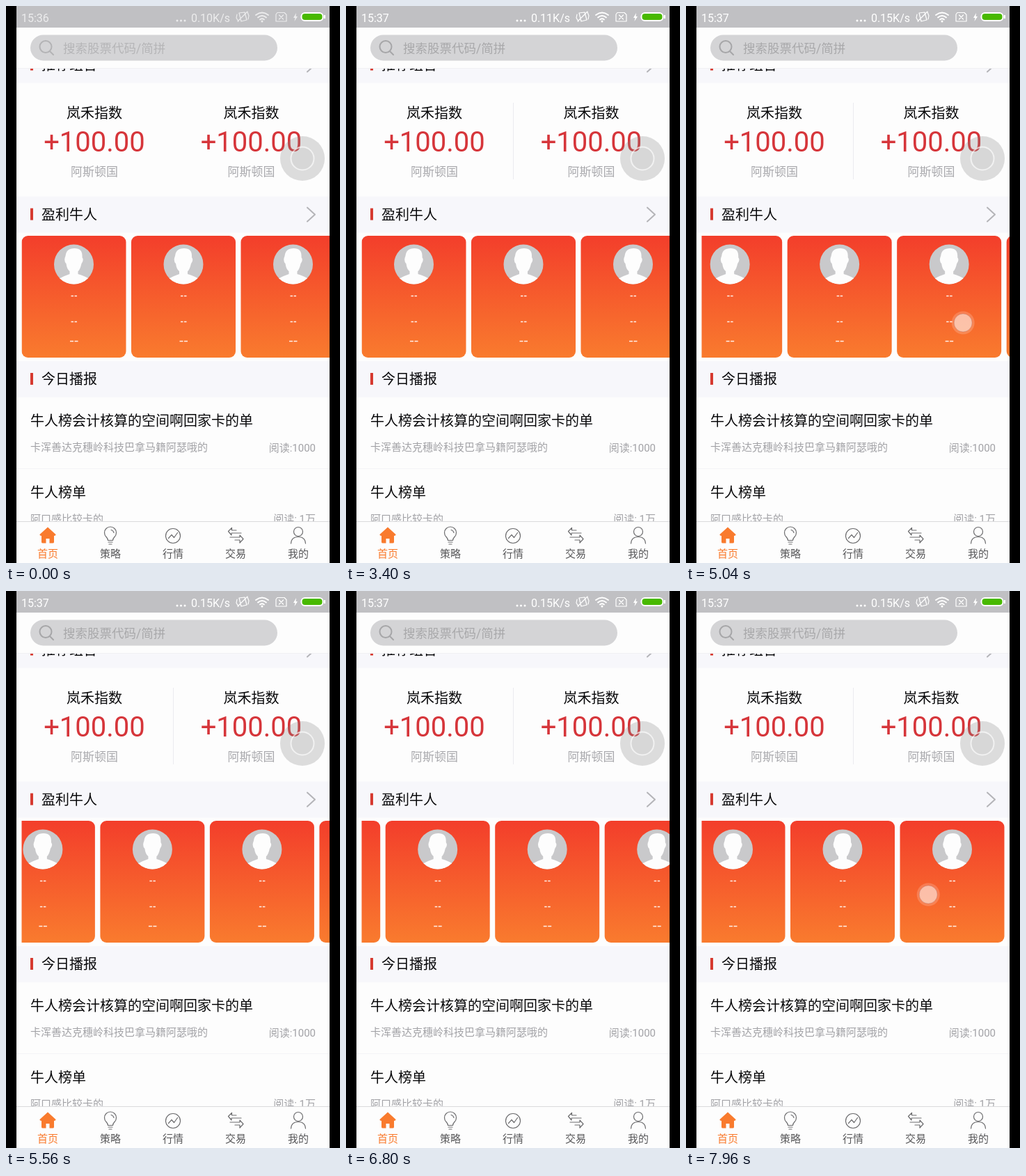
These frames come from a looping animation (480x800 px, 8 s). An HTML page:

```html
<!DOCTYPE html>
<html lang="zh-CN">
<head>
<meta charset="utf-8">
<style>
html, body { margin: 0; width: 100%; height: 100%; overflow: hidden; background: #000; }
svg { display: block; width: 100vw; height: 100vh; }
text { font-family: Roboto, "Noto Sans CJK SC", "Noto Sans CJK", sans-serif; }
.line { fill: none; stroke-width: 1.2; stroke-linecap: round; stroke-linejoin: round; }
.mid { text-anchor: middle; }
.end { text-anchor: end; }
.title { font-size: 20px; fill: #08080a; }
.note { font-size: 15px; fill: #a2a2a6; }
.band { fill: #f7f7fb; }
</style>
</head>
<body>
<svg viewBox="0 0 480 800">
  <defs>
    <linearGradient id="fire" x2="0" y2="1">
      <stop stop-color="#f33e2b"/><stop offset="1" stop-color="#f97b2e"/>
    </linearGradient>
    <clipPath id="page"><rect x="15" y="89" width="450" height="651"/></clipPath>
    <clipPath id="strip"><rect x="22.5" y="325" width="442.5" height="185"/></clipPath>
    <clipPath id="face"><circle cx="75" cy="41" r="28.5"/></clipPath>
    <g id="card">
      <rect width="150" height="175" rx="9" fill="url(#fire)"/>
      <circle cx="75" cy="41" r="28.5" fill="#c9c9cb"/>
      <path clip-path="url(#face)" fill="#fdfdfd" d="M63 29Q64 18 76 18Q88 18 87 31Q90 35 86 40Q84 49 81 51V55Q91 58 97 62V72H53V62Q60 58 69 55V51Q65 48 64 40Q60 36 63 29Z"/>
      <path d="M71 86.500h3.500m1.500 0h3.500M71 123.500h3.500m1.500 0h3.500M69.500 151.500h5m1.500 0h5" stroke="#fff0e8" stroke-width="1.500"/>
    </g>
  </defs>

  <rect x="15" width="450" height="800" fill="#fdfdfd"/>

  <g clip-path="url(#page)">
    <g id="sections"></g>
    <g id="quotes"></g>
    <path id="divider" d="M240.500 139V249" stroke="#ebebf0"/>
    <g clip-path="url(#strip)"><g id="cards"></g></g>
    <text class="title" x="35" y="602.500">牛人榜会计核算的空间啊回家卡的单</text>
    <text class="note" x="35" y="639">卡浑善达克穗岭科技巴拿马籍阿瑟哦的</text>
    <text class="note end" x="445" y="639.500">阅读:1000</text>
    <path d="M15 664.500H465" stroke="#f4f4f7"/>
    <text class="title" x="35" y="705.500">牛人榜单</text>
    <text class="note" x="35" y="742">阿口感比较卡的</text>
    <text class="note end" x="445" y="742">阅读: 1万</text>
  </g>

  <rect x="15" width="450" height="31" fill="#c0c0c3"/>
  <g id="status" fill="#fff" font-size="16">
    <text id="clock" x="22" y="22.500"></text>
    <text id="speed" class="end" x="322" y="22.500"></text>
    <g><circle cx="246" cy="21" r="1.500"/><circle cx="251.500" cy="21" r="1.500"/><circle cx="257" cy="21" r="1.500"/></g>
    <g class="line" stroke="#fff">
      <path d="M335 10l8-1 3 11-8 2zM332 12l-1 5 3 5M347 9l2 5-1 5M333 22L347 8"/>
      <path d="M359 13q9-7 18 0M362 16.500q6-5 12 0M365 19.500q3-2.500 6 0" stroke-width="1.800"/>
      <path d="M390 9.500h10l3 3V22H388V12zM392.500 13l6 6m0-6l-6 6"/>
    </g>
    <circle cx="368" cy="22" r="1.500"/>
    <path d="M417 10l-4 7h2.500l-1 5 4.500-7h-2.500z"/>
  </g>
  <rect x="424.500" y="10" width="31" height="11" rx="5" fill="#48b900" stroke="#fff" stroke-width="2"/>
  <rect x="457" y="13" width="2" height="5" fill="#fff"/>

  <rect x="35" y="41.500" width="355" height="37" rx="18.500" fill="#d4d4d6"/>
  <path d="M15 89.500H465" stroke="#f0f0f3"/>
  <g id="search">
    <g class="line" stroke="#a6a6a8" style="stroke-width:2"><circle cx="57" cy="58.500" r="8.500"/><path d="M63 65l5 5"/></g>
    <text x="82" y="67" font-size="17.500" fill="#a8a8aa">搜索股票代码/简拼</text>
  </g>

  <g fill="#808080" fill-opacity=".27">
    <circle cx="426" cy="219" r="32"/>
    <circle cx="426" cy="219" r="16.500" fill-opacity=".06" stroke="#fff" stroke-opacity=".65" stroke-width="2"/>
  </g>

  <path d="M15 740.500H465" stroke="#dadadc"/>
  <path d="M60 748.500L71.500 759Q72 761 69 761V770Q69 771.500 67 771.500H62.500V765H57.500V771.500H53Q51 771.500 51 770V761Q48 761 48.500 759Z" fill="#f97b2e"/>
  <g class="line" stroke="#6c6c6e">
    <path d="M146.500 767.500Q146.500 765 144 762.500A8.500 8.500 0 1 1 156 762.500Q153.500 765 153.500 767.500ZM147 770h6M148 773h4M151 752.500q3 .500 4 4"/>
    <circle cx="240" cy="761" r="10.500"/><path d="M233.500 764.500l4.500-5 3.500 4 5-7"/>
    <path d="M338 757H324V760L319.500 754.500 324.500 749.500V753H331M322 763H336V760L341 765.500 336 771V767H329"/>
    <circle cx="420" cy="755" r="6.500"/><path d="M409.500 772Q410 762.500 420 762.500T430.500 772"/>
  </g>
  <g id="tabs" class="mid" font-size="15"></g>

  <g id="touch">
    <circle r="16.500" fill="#fff" opacity=".18"/>
    <circle r="13" fill="#fff" fill-opacity=".5" stroke="#b06a60" stroke-opacity=".4"/>
  </g>
</svg>
<script>
const LOOP = 8000, PITCH = 157.5, LEFT = 22.5;
const byId = id => document.getElementById(id);

const section = ([label, y]) => `
  <rect class="band" x="15" y="${y - 26}" width="450" height="52"/>
  <rect x="35" y="${y - 9}" width="4" height="17" fill="#d63a30"/>
  <text class="title" x="51" y="${y + 7}">${label}</text>
  ${y < 500 ? `<path class="line" style="stroke-width:2" d="M433 ${y - 10}l11 10 -11 10" stroke="#b4b4b8"/>` : ''}`;
byId('sections').innerHTML =
  [['推荐组合', 84.5], ['盈利牛人', 299.5], ['今日播报', 536]].map(section).join('');

byId('quotes').innerHTML = [127, 352.5].map(x => `
  <text class="title mid" x="${x}" y="160.5">岚禾指数</text>
  <text class="mid" x="${x}" y="209" font-size="40" fill="#d6353a">+100.00</text>
  <text class="mid" x="${x}" y="243.5" font-size="17" fill="#a9a9ad">阿斯顿国</text>`).join('');

byId('cards').innerHTML = Array.from({ length: 10 }, (_, i) =>
  `<use href="#card" x="${LEFT + i * PITCH}" y="330"/>`).join('');

byId('tabs').innerHTML = ['首页', '策略', '行情', '交易', '我的'].map((label, i) =>
  `<text x="${60 + 90 * i}" y="792" fill="${i ? '#58585a' : '#f97b2e'}">${label}</text>`).join('');

// Scroll stops: [time, distance, ease-out power of the approach]; the last one is the end of the list
const stops = [
  [0, 0], [3440, 0], [3640, 90], [4000, 137.5, 2],
  [4040, 137.5], [4200, 235], [4560, 328, 2],
  [4760, 328], [5040, 348.5], [5240, 516], [7520, 1132.5, 1.96], [LOOP, 1132.5]
];

function scrollAt(t) {
  const i = stops.findIndex(s => s[0] > t);
  const [t0, x0] = stops[i - 1], [t1, x1, power = 1] = stops[i];
  return x1 - (x1 - x0) * ((t1 - t) / (t1 - t0)) ** power;
}

// Finger strokes from x0 to x1 at height y
const strokes = [
  { from: 3440, to: 3640, x0: 399, x1: 309, y: 428 },
  { from: 4000, to: 4040, x0: 399, x1: 399, y: 428 },
  { from: 4040, to: 4200, x0: 399, x1: 301, y: 428 },
  { from: 4760, to: 5040, x0: 419, x1: 399, y: 455 },
  { from: 5040, to: 5240, x0: 399, x1: 231, y: 455 },
  { from: 7720, to: 8000, x0: 399, x1: 340, y: 436 }
];

function draw(now) {
  const t = now % LOOP;
  byId('cards').setAttribute('transform', `translate(${-scrollAt(t)})`);

  const stroke = strokes.find(s => t >= s.from && t < s.to);
  byId('touch').style.display = stroke ? '' : 'none';
  if (stroke) {
    const { from, to, x0, x1, y } = stroke;
    byId('touch').setAttribute('transform', `translate(${x0 + (x1 - x0) * (t - from) / (to - from)} ${y})`);
  }

  const settled = t >= 440;
  byId('clock').textContent = settled ? '15:37' : '15:36';
  byId('speed').textContent = t < 440 ? '0.10K/s' : t < 4400 ? '0.11K/s' : '0.15K/s';
  byId('status').setAttribute('opacity', settled ? 1 : .7);
  byId('search').setAttribute('opacity', settled ? 1 : .7);
  byId('divider').setAttribute('opacity', settled ? 1 : 0);
}

const start = performance.now();
function tick() {
  draw(performance.now() - start);
  requestAnimationFrame(tick);
}
tick();
</script>
</body>
</html>
```
